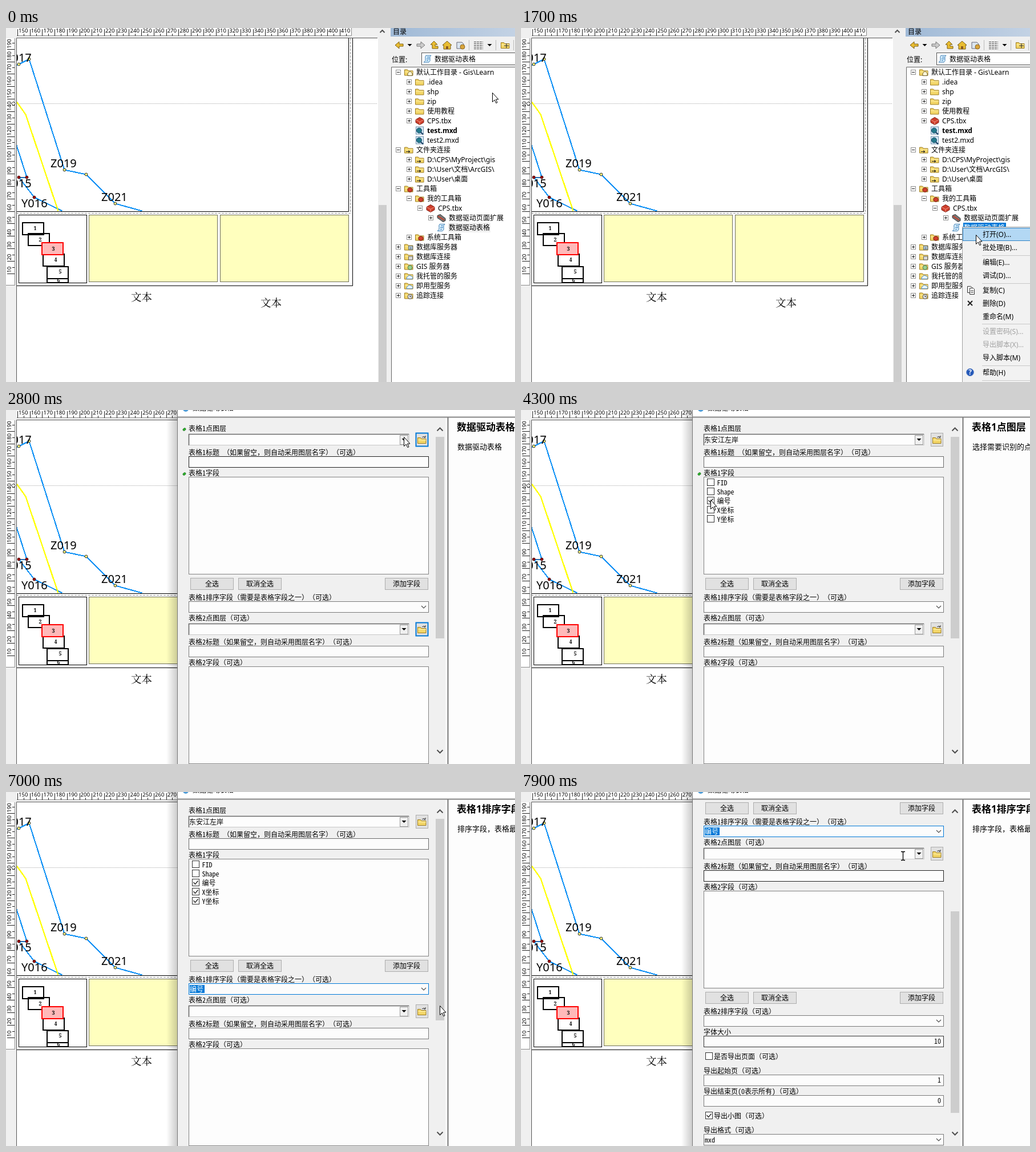
These frames come from a looping animation (892x620 px, 8000 ms). An HTML page:

```html
<!DOCTYPE html>
<html lang="zh-CN">
<head>
<meta charset="utf-8">
<title>数据驱动表格</title>
<style>
html,body{margin:0;width:100%;height:100%;overflow:hidden;background:#f0f0f0}
svg{display:block;width:892px;height:620px}
text{font:12px "Noto Sans","Noto Sans CJK SC",sans-serif;fill:#000;white-space:pre;text-spacing-trim:space-all}
.m{font-family:"Noto Sans Mono CJK SC","Noto Sans CJK SC",monospace}
.r{font-size:9.6px}
.z{font-size:20px}
.s{font:18.5px "Noto Serif CJK SC","Noto Serif","Noto Sans CJK SC",serif}
.n{font:bold 9px "Noto Serif",serif;text-anchor:middle}
.b{font-weight:bold}
.h{font-size:17px;font-weight:bold}
.p{font-size:13px}
.e{text-anchor:end}
.c{text-anchor:middle}
.g{fill:#a0a0a0}
.w{fill:#fff}
</style>
</head>
<body>
<svg id="stage" viewBox="0 0 892 620"></svg>
<script>
const LOOP = 8000, SCROLL = 276;
const BLUE = '#0a8ff5', GREY = '#f0f0f0';

const rect = (x, y, w, h, fill, extra = '') =>
  `<rect x="${x}" y="${y}" width="${w}" height="${h}" fill="${fill}" ${extra}/>`;
const box = (x, y, w, h, fill, stroke, extra = '') =>
  rect(x + .5, y + .5, w - 1, h - 1, fill, `stroke="${stroke}" ${extra}`);
const path = (d, stroke, fill = 'none', width = 1, extra = '') =>
  `<path d="${d}" stroke="${stroke}" fill="${fill}" stroke-width="${width}" ${extra}/>`;
const text = (x, y, s, cls = '', extra = '') =>
  `<text x="${x}" y="${y}" class="${cls}" ${extra}>${s}</text>`;
const dot = (x, y, r, fill, stroke = 'none') =>
  `<circle cx="${x}" cy="${y}" r="${r}" fill="${fill}" stroke="${stroke}"/>`;
const group = (id, body, extra = '') => `<g id="${id}" ${extra}>${body}</g>`;
const at = (x, y, body) => `<g transform="translate(${x} ${y})">${body}</g>`;
const chevron = (x, y, dir, size = 4.5, width = 2) =>
  path(`M${x - size} ${y - dir * size / 2}L${x} ${y + dir * size / 2}L${x + size} ${y - dir * size / 2}`, '#505050', 'none', width);
const caret = (x, y) => path(`M${x - 4} ${y - 2}h8l-4 4z`, 'none', '#000');

// Icons are drawn around their own centre.
const folder = path('M-7.5 5.5v-10h5l1.5 2h8v8z', '#9c7b1e', '#f3d668') + path('M-7 -.5H7', '#fff3b0');
const badge = (x, y, fill, stroke) => box(x, y, 8, 7, fill, stroke);
const icons = {
  folder,
  home: folder + path('M-2 6V2L2 -2L6 2V6z', '#6b5a2a', '#fff8d8'),
  link: folder + path('M-5 3H1M-1 1L2 3L-1 5', '#222'),
  box: path('M-7 -2L0 -6L7 -2V3L0 7L-7 3z', '#7e1d12', '#cf3f2c') + path('M-7 -2L0 2L7 -2M0 2V7', '#f09a88'),
  boxes: folder + path('M-2 0L2 -2L6 0V4L2 6L-2 4z', '#7e1d12', '#cf3f2c'),
  map: box(-7, -7, 14, 14, '#dceefa', '#6d8ba8') + dot(-1, 0, 4.5, '#247a8c', '#164b68') + path('M2 3L6 7', '#163b60', 'none', 2),
  tool: path('M-7 -4L-2 -6L7 1V5L3 7L-7 0z', '#333', '#777') + path('M-6 -3L5 4', '#c7402b', 'none', 2),
  script: path('M-3 -6H6Q3 -4 4 0T2 6H-7Q-3 4 -4 0T-3 -6z', '#3f7fb5', '#d9effc') + path('M-1 -3H3M-2 0H3M-2 3H1', '#2874b8'),
  server: folder + badge(-1, -2, '#cfe3ef', '#567') + path('M1 1h4M1 3h4', '#567'),
  data: folder + badge(-1, -1, '#d9d9d9', '#666'),
  globe: folder + dot(2, 2, 3.8, '#9bd08f', '#47784a'),
  cloud: folder + path('M-4 5Q-5 2 -2 1Q0 -3 4 0Q8 1 6 5z', '#5288b8', '#e4f3ff'),
  track: folder + dot(2, 2, 4, '#ddd', '#555') + path('M2 0v2h2', '#333')
};

function mapView() {
  let s = rect(19, 0, 587, 14, '#fff') + rect(0, 18, 16, 433, '#fff') + path('M19 13.5H605.5V0M15.5 18V450.5H0', '#8a8a8a');
  for (let v = 150; v <= 410; v += 10) {
    const x = 20.5 + (v - 150) * 2.172;
    s += path(`M${x} 2V14M${x + 10.8} 10V14`, '#222', 'none', 1, 'shape-rendering="crispEdges"') + text(x + 1.5, 8, v, 'r');
  }
  for (let v = 10; v <= 190; v += 10) {
    const y = 452 - v * 2.183;
    s += path(`M2 ${y}H15M11 ${y - 10.9}H15`, '#222', 'none', 1, 'shape-rendering="crispEdges"') +
      text(0, 0, v, 'r', `transform="translate(9 ${y - 1.5}) rotate(-90)"`);
  }
  s += rect(18, 17, 634, 603, '#fff') + path('M18.5 620V17.5H651', '#555');
  s += path('M19 132.5H651', '#aaa', 'none', 1, 'stroke-dasharray="1 1"') +
    path('M603.5 18V324.5H19', '#999', 'none', 1, 'stroke-dasharray="4 2"') + path('M13 129l3.5 3.5l-3.5 3.5l-3.5-3.5z', '#222', '#fff');
  s += path('M600.5 18V321.5H19M607.5 18V451.5H19', '#000');

  const lines = path('M17 65L22 63L40 54L102 248L140 256L191 307L238 320', BLUE, 'none', 2) +
    path('M18 205L36 261H22L49 296L98 320', BLUE, 'none', 2) + path('M22 261H36', '#334e80', 'none', 1.5) +
    path('M18 129L22 134L34 151L91 320', '#ffff00', 'none', 2.3);
  let marks = '';
  for (const [x, y] of [[22, 63], [40, 54], [102, 248], [140, 256], [191, 307]]) marks += dot(x, y, 2.4, '#ffff80', '#222');
  for (const [x, y] of [[22, 261], [36, 261], [49, 296]]) marks += dot(x, y, 2.4, '#a00000', '#400000');
  s += `<g clip-path="url(#page)">` + at(.5, .5, `<g shape-rendering="crispEdges">${lines}</g>` + marks);
  for (const [x, y, t] of [[-1, 59, 'Z017'], [78, 244, 'Z019'], [167, 303, 'Z021'], [-1, 279, 'Y015'], [27, 314, 'Y016']]) s += text(x, y, t, 'z');
  s += '</g>' + box(22, 327, 120, 120, '#fff', '#000');

  const cells = [[29, 341, 51, 354], [39, 360, 60, 374], [65, 396, 87, 409], [72, 418, 95, 430], [72, 439, 92, 445], [63, 376, 83, 390]];
  cells.forEach(([x, y, tx, ty], i) => {
    const hot = i === 5, n = hot ? 3 : i < 2 ? i + 1 : i + 2;
    s += rect(x, y, 37, n === 6 ? 7 : 21, hot ? '#ffb9b9' : 'none', `stroke="${hot ? '#f00' : '#000'}" stroke-width="2"`) + text(tx, ty, n, 'n');
  });
  s += box(145, 327, 226, 118, '#ffffbe', '#6e6e5a') + box(375, 327, 226, 118, '#ffffbe', '#6e6e5a');
  s += text(219, 478, '文本', 's') + text(446, 488, '文本', 's');
  return s + rect(652, 0, 16, 620, GREY) + rect(653, 310, 14, 310, '#cdcdcd') + chevron(659.5, 6, -1, 4);
}

const rows = [
  [1, '-', 'home', '默认工作目录 - Gis\\Learn'], [2, '+', 'folder', '.idea'], [2, '+', 'folder', 'shp'], [2, '+', 'folder', 'zip'],
  [2, '+', 'folder', '使用教程'], [2, '+', 'box', 'CPS.tbx'], [2, '', 'map', 'test.mxd', 'b'], [2, '', 'map', 'test2.mxd'],
  [1, '-', 'link', '文件夹连接'], [2, '+', 'link', 'D:\\CPS\\MyProject\\gis'], [2, '+', 'link', 'D:\\User\\文档\\ArcGIS\\'], [2, '+', 'link', 'D:\\User\\桌面'],
  [1, '-', 'boxes', '工具箱'], [2, '-', 'boxes', '我的工具箱'], [3, '-', 'box', 'CPS.tbx'], [4, '+', 'tool', '数据驱动页面扩展'], [4, '', 'script', '数据驱动表格'],
  [2, '+', 'boxes', '系统工具箱'], [1, '+', 'server', '数据库服务器'], [1, '+', 'data', '数据库连接'], [1, '+', 'globe', 'GIS 服务器'],
  [1, '+', 'cloud', '我托管的服务'], [1, '+', 'cloud', '即用型服务'], [1, '+', 'track', '追踪连接']
];

function catalog() {
  let s = rect(674, 0, 218, 15, 'url(#cap)') + text(678, 11, '目录');
  const gold = '#e9bd32', edge = '#7a5c10';
  s += path('M682 30L689 24V28H696V32H689V36z', edge, gold) + caret(707.5, 30) +
    path('M734 30L727 24V28H720V32H727V36z', '#777', '#ccc') +
    path('M744 29L750 23L756 29H752V32H757V36H747V29z', edge, gold) +
    path('M765 30L773 23L781 30H779V37H767V30z', edge, gold) + rect(771, 32, 4, 5, '#8a5a20') +
    path('M790 25h9l3 3v8h-12z', '#667', '#dbe6f0') + dot(800, 33, 4, '#d9a53c', '#8a6520') +
    path('M811.5 21V39M858.5 21V39M889.5 21V39', '#bbb');
  for (let y = 24; y < 37; y += 3) s += path(`M820 ${y + .5}H836`, '#444', 'none', 1, 'stroke-dasharray="4 1"');
  s += caret(847.5, 30) + at(875, 30, folder) + path('M873 31h8M877 27v8', '#222');
  s += text(676, 60, '位置:') + box(728, 43, 170, 22, '#fff', '#555') + at(739, 54, icons.script) + text(751, 59, '数据驱动表格');
  s += rect(675, 68, 217, 552, '#fff') + path('M675.5 620V68.5H892', '#666');
  rows.forEach(([level, mark, icon, label, cls], i) => {
    const x = 668 + level * 19, y = 77 + i * 17;
    if (mark) s += box(x - 4, y - 4, 9, 9, '#fff', '#919191') + path(`M${x - 2} ${y + .5}h5` + (mark === '+' ? `M${x + .5} ${y - 2}v5` : ''), '#222');
    if (i === 16) s += rect(x + 31, y - 8, 74, 17, '#f0f0f0') + group('picked', rect(x + 31, y - 8, 75, 17, '#0078d7'));
    s += at(x + 19, y + .5, icons[icon]) + text(x + 32, y + 5, label, cls, i === 16 ? 'id="tool"' : '');
  });
  return s;
}

function menu() {
  let s = box(773, 348, 125, 280, '#f2f2f2', '#a0a0a0') + box(774, 350, 123, 23, '#b3d8f4', '#2f83c5');
  const items = [[362, '打开(O)...'], [385, '批处理(B)...'], [411, '编辑(E)...'], [434, '调试(D)...'], [460, '复制(C)'], [483, '删除(D)'],
    [506, '重命名(M)'], [532, '设置密码(S)...', 'g'], [555, '导出脚本(X)...', 'g'], [578, '导入脚本(M)'], [604, '帮助(H)']];
  for (const [y, t, cls] of items) s += text(809, y + 4, t, cls);
  for (const y of [398, 447, 518, 591, 617]) s += path(`M808 ${y}.5H892`, '#c8c8c8');
  s += path('M782.5 452.5h6l2 2v9h-8z', '#333', '#fff') + path('M786.5 455.5h6l2 2v9h-8zM788 460h5M788 463h5', '#333', '#fff') +
    path('M783 478l8 8M791 478l-8 8', '#222', 'none', 2) + dot(787, 603, 6.5, '#2458b8', '#7e9bd0') + text(787, 607, '?', 'b c w');
  return s;
}

const label = (y, s, x = 320) => text(x, y + 4.5, s, 'm');
const input = (y, value = '', id = '') => box(320, y, 421, 20, '#fcfcfc', '#7a7a7a', id && `id="${id}"`) + text(736, y + 14, value, 'm e');
const combo = (y, id = '') => box(320, y, 421, 20, '#fcfcfc', '#7a7a7a', id && `id="${id}"`) + chevron(732, y + 10, 1, 4, 1.2);
const list = y => box(320, y, 421, 171, '#fdfdfd', '#828282');
const button = (x, y, s) => box(x, y, 76, 21, '#e1e1e1', '#adadad') + text(x + 38, y + 15, s, 'm c');
const buttons = y => button(323, y, '全选') + button(407, y, '取消全选') + button(664, y, '添加字段');
const tick = (x, y) => path(`M${x + 2.5} ${y + 6}l3 3.5l5-6`, '#222', 'none', 1.3);
const check = (x, y, mark = '') => box(x, y, 13, 13, '#fff', '#333') + mark;
const layer = y => rect(320, y, 387, 20, '#fdfdfd') + path(`M320.5 ${y + 20}V${y + .5}H706`, '#696969', 'none', 1.6) +
  path(`M321 ${y + 19.5}H706.5V${y}`, '#c8c8c8') + box(690, y + 2, 15, 17, GREY, '#999') + caret(697.5, y + 10) +
  box(718, y - 2, 22, 24, '#e1e1e1', '#adadad') + at(729, y + 11, folder + path('M0 -5Q3 -8 6 -5M6 -8V-5H3', '#333'));
const focus = y => box(718, y - 2, 22, 24, 'none', '#0078d7', 'stroke-width="2"');
const bead = y => `<ellipse cx="312.5" cy="${y}" rx="2.8" ry="2" fill="#2fb52f" stroke="#146414" stroke-width=".7" transform="rotate(-35 312.5 ${y})"/>`;
const fields = ['FID', 'Shape', '编号', 'X坐标', 'Y坐标'];

function form() {
  let s = group('bead1', bead(34)) + label(32, '表格1点图层') + layer(42) + group('layerName', label(52, '东安江左岸', 321)) +
    label(74, '表格1标题 （如果留空，则自动采用图层名字）（可选）') + input(81, '', 'title1') +
    group('bead2', bead(112)) + label(110, '表格1字段') + list(117);
  s += group('fields', fields.map((f, i) => check(326, 120 + i * 16, i > 1 ? group('tick' + i, tick(326, 120 + i * 16)) : '') + label(127 + i * 16, f, 343.5)).join(''));
  s += buttons(294) + label(328, '表格1排序字段（需要是表格字段之一）（可选）') + combo(335, 'sort') +
    group('sortHot', box(724, 335, 17, 20, '#e5f1fb', '#0078d7') + chevron(732, 345, 1, 4, 1.2)) +
    group('sortValue', rect(322, 338, 26, 14, '#0078d7') + text(322, 349.5, '编号', 'm w'));
  s += label(364, '表格2点图层（可选）') + layer(374) + group('focus', focus(42) + focus(374)) +
    label(406, '表格2标题（如果留空，则自动采用图层名字）（可选）') + input(413, '', 'title2') + label(442, '表格2字段（可选）') + list(449) + buttons(626);
  s += label(660, '表格2排序字段（可选）') + combo(667) + label(696, '字体大小') + input(703, 10, 'size') +
    check(323, 732) + label(739, '是否导出页面（可选）', 338) + label(764, '导出起始页（可选）') + input(771, 1) +
    label(800, '导出结束页(0表示所有)（可选）') + input(807, 0) + check(323, 836, tick(323, 836)) + label(843, '导出小图（可选）', 338) +
    label(868, '导出格式（可选）') + combo(875) + label(885, 'mxd', 322);
  s += group('layerDrop', box(320, 62, 387, 20, '#fff', '#000') + rect(321, 64, 385, 16, '#0078d7') + text(322, 76, '东安江左岸', 'm w'));
  s += group('sortDrop', box(320, 354, 421, 67, '#fff', '#000') + rect(321, 381, 419, 13, '#0078d7') +
    fields.map((f, i) => text(322, 365.5 + i * 13, f, i === 2 ? 'm w' : 'm')).join(''));
  return s;
}

function dialog() {
  return rect(281, 0, 19, 620, 'url(#shade)') + rect(300, 0, 592, 620, GREY) + rect(301, 0, 591, 12, '#fff') +
    dot(315, -2, 5, '#4b9bd8') + text(327, 1, '数据驱动表格') +
    path('M300.5 0V620', '#777') + path('M301 12.5H892', '#888', 'none', 2) +
    `<g clip-path="url(#view)">${group('form', form())}</g>` +
    rect(753, 25, 15, 582, GREY) + group('thumb', rect(753, 47, 15, 353, '#cdcdcd')) + chevron(760.5, 34, -1, 5) + chevron(760.5, 598, 1, 5) +
    rect(770, 14, 4, 606, '#f8f8f8') + rect(775, 14, 117, 606, '#fdfdfd') + path('M774.5 620V13', '#777', 'none', 2) +
    text(790, 36, '', 'h', 'id="head"') + text(791, 69, '', 'p', 'id="body"');
}

const stage = document.getElementById('stage');
stage.innerHTML = `<defs>
<clipPath id="page"><rect x="19" y="18" width="581" height="303"/></clipPath>
<clipPath id="view"><rect x="302" y="14" width="450" height="606"/></clipPath>
<linearGradient id="cap"><stop stop-color="#9fb9d6"/><stop offset="1" stop-color="#c3d2e4"/></linearGradient>
<linearGradient id="shade"><stop stop-opacity="0"/><stop offset="1" stop-opacity=".2"/></linearGradient></defs>` +
  rect(0, 0, 892, 620, GREY) + mapView() + catalog() + group('menu', menu()) + group('dialog', dialog()) +
  group('arrow', path('M.5 .5V16.5L4.2 13L6.8 18.6L9 17.6L6.5 12H11z', '#000', '#fff')) +
  group('beam', path('M-3.5 -7.5H-1L0 -6.5L1 -7.5H3.5M0 -6.5V6.5M-3.5 7.5H-1L0 6.5L1 7.5H3.5', '#000', 'none', 1.3));

const el = {};
for (const node of stage.querySelectorAll('[id]')) el[node.id] = node;
const show = (id, on) => el[id].setAttribute('display', on ? 'inline' : 'none');
const move = (id, x, y) => el[id].setAttribute('transform', `translate(${x} ${y})`);
const border = (id, color) => el[id].setAttribute('stroke', color);

// time, x, y
const route = [[0, 852, 113], [400, 770, 235], [550, 734, 300], [800, 773, 349], [1400, 773, 349], [1700, 797, 362], [2100, 797, 362],
  [2300, 688, 330], [2400, 591, 260], [2500, 549, 213], [2800, 697, 47], [3000, 697, 49], [3300, 420, 70], [3700, 420, 70], [4200, 332, 157],
  [4300, 332, 157], [4600, 332, 174], [4700, 332, 188], [4800, 332, 190], [5000, 380, 235], [5400, 746, 366], [5500, 735, 345], [5700, 734, 343],
  [5800, 734, 343], [6300, 400, 386], [6500, 400, 386], [7000, 760, 374], [7100, 760, 374], [7500, 760, 536], [7700, 655, 185], [7900, 669, 112], [8000, 669, 112]];

function pointer(t) {
  const i = Math.max(1, route.findIndex(p => p[0] >= t));
  const [t0, x0, y0] = route[i - 1], [t1, x1, y1] = route[i];
  const k = (t - t0) / (t1 - t0);
  return [x0 + (x1 - x0) * k, y0 + (y1 - y0) * k];
}

const help = [[0, '数据驱动表格', '数据驱动表格'], [3000, '表格1点图层', '选择需要识别的点'], [4400, '表格1字段', '需要生成表格的数'], [5800, '表格1排序字段', '排序字段，表格最']];

function draw(time) {
  const t = Math.floor(time % LOOP / 100) * 100;
  const within = (a, b) => t >= a && t < b;
  show('picked', t >= 1400);
  el.tool.style.fill = t >= 1400 ? '#fff' : '#000';
  show('menu', within(1400, 2000));
  show('dialog', t >= 2100);
  show('bead1', t < 3400);
  show('bead2', t < 5800);
  show('focus', t < 3000);
  show('layerDrop', within(3000, 3400));
  show('layerName', t >= 3400);
  show('fields', t >= 3500);
  [4300, 4600, 4800].forEach((start, i) => show('tick' + (i + 2), t >= start));
  show('sortHot', within(5500, 6500));
  show('sortDrop', within(5800, 6500));
  show('sortValue', t >= 6500);
  border('title1', within(2700, 3300) ? '#222' : '#6a6a6a');
  border('sort', t >= 6500 ? '#0078d7' : t >= 5500 ? '#222' : '#7a7a7a');
  border('title2', t >= 7700 ? '#222' : '#7a7a7a');
  border('size', t >= 7700 ? '#333' : '#7a7a7a');
  const [, head, body] = help.filter(h => t >= h[0]).pop();
  el.head.textContent = head;
  el.body.textContent = body;
  const drag = Math.min(1, Math.max(0, (t - 7100) / 400));
  move('form', 0, -Math.round(drag * SCROLL));
  move('thumb', 0, Math.round(drag * 162));
  const [x, y] = pointer(t).map(Math.round);
  move('arrow', x, y);
  move('beam', x + .5, y);
  show('arrow', t < 7800);
  show('beam', t >= 7800);
}

const start = performance.now();
function tickFrame(now) {
  draw(Math.max(0, now - start));
  requestAnimationFrame(tickFrame);
}
draw(0);
requestAnimationFrame(tickFrame);
</script>
</body>
</html>
```
